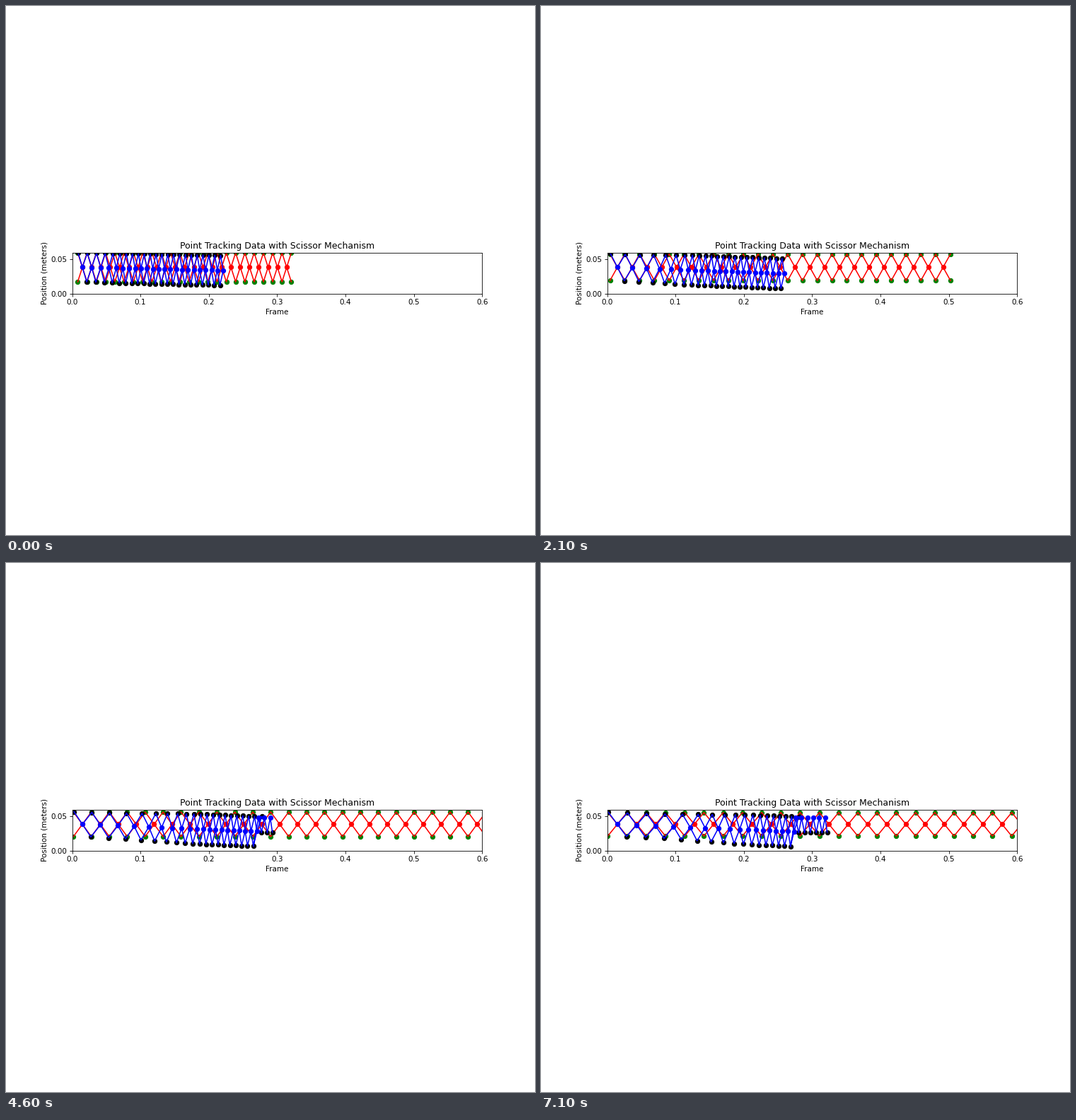
Write a matplotlib script that moves like this. It is 748 px wide and 748 px high and loops after 7200 ms.

```python
import numpy as np
import matplotlib.pyplot as plt
from matplotlib.animation import FuncAnimation

FRAMES, INTERVAL = 72, 100
SIZE, INCHES = 748, 10
LEFT, FLOOR, SCALE = 93.5, 406.7, 966.2   # stage pixels of the axes
HALF_LINK = 21.5
FIRST = np.array([108, 369.4])            # pivot that never moves
UNITS = 23
CLOSED_GAP = 8.3                          # pivot spacing where still folded
SLIP_START, SLIP_EVERY = 32, 7            # frames
SLIP_Y, SLIP_BACK = 360.3, 6


def to_data(points):
    p = np.asarray(points, float).reshape(-1, 2)
    return (p[:, 0] - LEFT) / SCALE, (FLOOR - p[:, 1]) / SCALE


def pitch_at(frame):
    return np.interp(frame, [0, 8, 28, 32, 39, 71],
                     [13.13, 16.54, 23.3, 24.2, 24.85, 27.2])


def joints_between(pivots, side):
    """Joints one half link from each pair of neighbours; side -1 is above."""
    a, b = pivots[:-1], pivots[1:]
    d = b - a
    dist = np.hypot(d[:, 0], d[:, 1])[:, None]
    height = np.sqrt(HALF_LINK ** 2 - dist ** 2 / 4)
    normal = np.column_stack([-d[:, 1], d[:, 0]]) / dist
    return (a + b) / 2 + side * height * normal


def zigzag(pivots, joints):
    """Path through the pivots with a joint in each gap."""
    path = np.empty((2 * len(pivots) - 1, 2))
    path[::2], path[1::2] = pivots, joints
    return path


def chain(*paths):
    """Join several paths into one with breaks between them."""
    gap = np.full((1, 2), np.nan)
    return np.vstack([part for path in paths for part in (path, gap)])


def ideal(frame):
    pitch = pitch_at(frame)
    rise = np.sqrt(HALF_LINK ** 2 - pitch ** 2 / 4)
    k = np.arange(UNITS + 1)
    x = FIRST[0] + pitch * (k - .5)
    swing = rise * (-1.0) ** k
    bars = [np.column_stack([x, FIRST[1] + s * swing]) for s in (1, -1)]
    pivots = np.column_stack([x[:-1] + pitch / 2, np.full(UNITS, FIRST[1])])
    return chain(*bars), np.vstack(bars), pivots


def tracked_pivots(frame):
    """Gaps open from the left, and the row sags to the right."""
    reach = 3.3 + .044 * frame
    k = np.arange(UNITS - 1)
    gaps = CLOSED_GAP + (pitch_at(frame) - CLOSED_GAP) * np.exp(-(k / reach) ** 2)
    x = np.append(0, np.cumsum(gaps))
    slope = .041 - .019 * np.exp(-frame / 13)
    return FIRST + np.column_stack([x, slope * x])


def tracked(frame):
    pivots = tracked_pivots(frame)
    slipped = max(0, 1 + (frame - SLIP_START) // SLIP_EVERY)
    body, tail = np.split(pivots, [UNITS - slipped])
    tops, lows = joints_between(body, -1), joints_between(body, 1)
    start = 2 * body[:1] - lows[:1]
    paths = [np.vstack([start, zigzag(body, tops)]), zigzag(body, lows)]
    joints = [start, tops, lows]

    if slipped:
        # The far end jumps up onto the row of top joints
        tail[:, 0] -= SLIP_BACK
        tail[:, 1] = SLIP_Y
        bridge = body[-1:] + [7, -21]
        end = tail[-1:] + [3, 20.3]
        feet = joints_between(tail, 1)
        paths += [np.vstack([body[-1:], bridge, tail[:1], lows[-1:]]),
                  np.vstack([zigzag(tail, feet), end])]
        joints += [bridge, feet, end]
    return chain(*paths), np.vstack(joints), pivots


fig, ax = plt.subplots(figsize=(INCHES, INCHES), dpi=SIZE / INCHES)
ax.set_xlim(0, 0.6)
ax.set_ylim(0, 0.06)
ax.set_aspect("equal")
ax.set_yticks([0, 0.05])
ax.set_xlabel("Frame")
ax.set_ylabel("Position (meters)")
ax.set_title("Point Tracking Data with Scissor Mechanism")


def linkage(link_color, joint_color):
    """Artists for joints, links and pivots, drawn in that order."""
    joints, = ax.plot([], [], "o", color=joint_color)
    links, = ax.plot([], [], "-", color=link_color)
    pivots, = ax.plot([], [], "o", color=link_color)
    return links, joints, pivots


ideal_art = linkage("red", "green")
tracked_art = linkage("blue", "black")


def update(frame):
    for art, pose in ((ideal_art, ideal), (tracked_art, tracked)):
        for line, points in zip(art, pose(frame)):
            line.set_data(*to_data(points))
    return ideal_art + tracked_art


anim = FuncAnimation(fig, update, frames=FRAMES, interval=INTERVAL,
                     repeat=True, repeat_delay=0)
plt.show()
```
